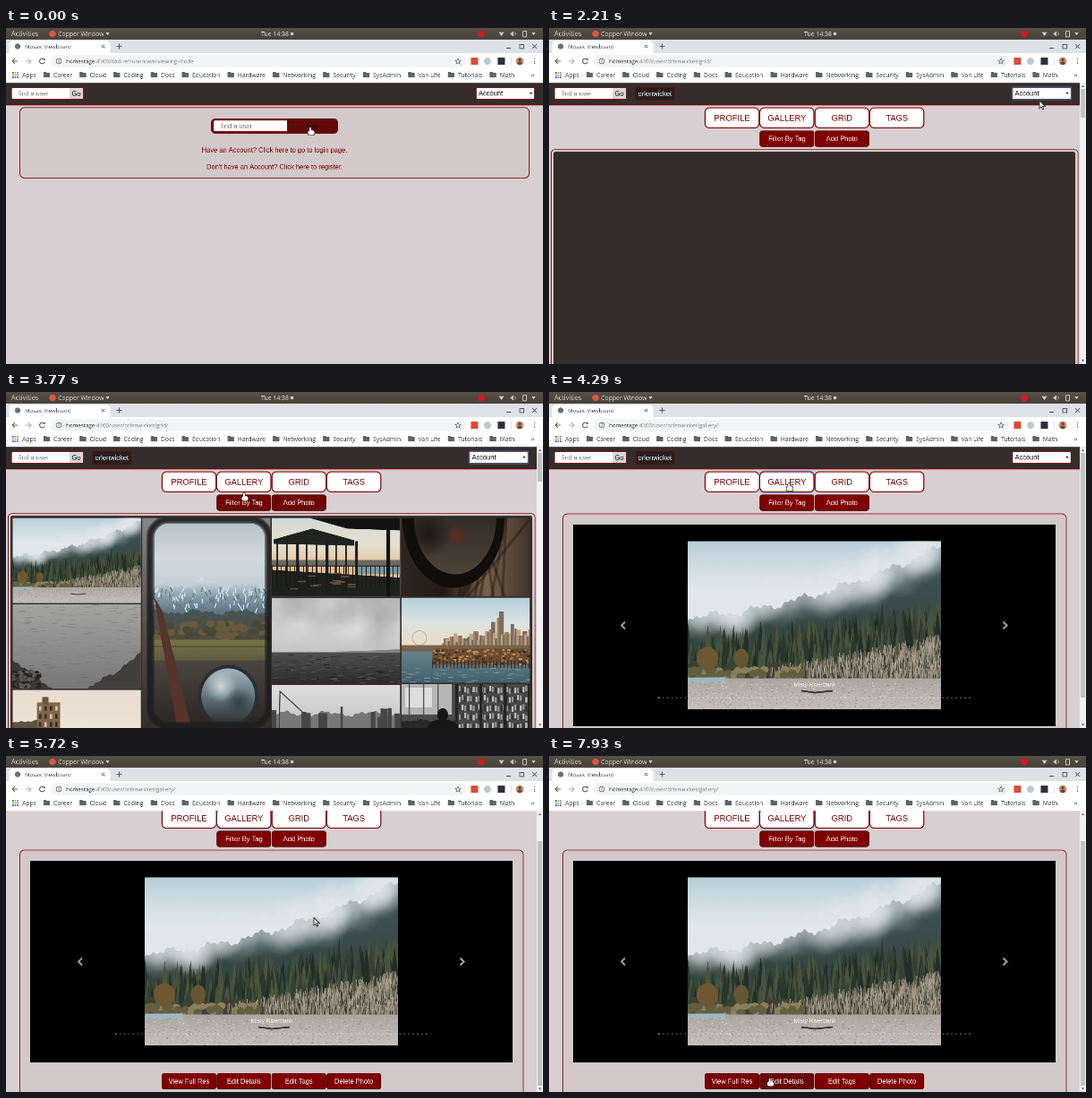
An HTML page with a canvas that plays this animation: 600 by 375 pixels, repeating every 8000 ms.

```html
<!DOCTYPE html>
<html lang="en">
<head>
<meta charset="utf-8">
<title>Photo site walkthrough</title>
<style>
html, body { margin: 0; width: 100%; height: 100%; overflow: hidden; background: #d7cfd1; }
canvas { display: block; width: 600px; height: 375px; }
</style>
</head>
<body>
<canvas id="stage" width="1280" height="800"></canvas>
<script>
const ctx = document.getElementById('stage').getContext('2d');
ctx.scale(1280 / 600, 800 / 375);
const LOOP = 8000, STEP = 130;
const GRID_AT = 1950, PHOTOS_AT = 2470, GALLERY_AT = 4160, SCROLL_AT = 5330;
const TOP = 61.2;
const UI = '"Open Sans", "Noto Sans", sans-serif';
const WEB = '"Liberation Sans", Arial, sans-serif';
const RED = '#7d0000', DARK = '#342d2c', PAGE = '#d7cfd1', PANEL = 'rgba(185,160,165,.14)';
const USER = 'orlenwicket', HOST = 'homestage';

// ---------- helpers ----------
function rect(x, y, w, h, c) {
  ctx.fillStyle = c;
  ctx.fillRect(x, y, w, h);
}
function paint(fill, stroke, lw) {
  if (fill) { ctx.fillStyle = fill; ctx.fill(); }
  if (stroke) { ctx.strokeStyle = stroke; ctx.lineWidth = lw; ctx.stroke(); }
}
function box(x, y, w, h, r, fill, stroke, lw = 1) {
  ctx.beginPath();
  ctx.roundRect(x, y, w, h, r);
  paint(fill, stroke, lw);
}
function oval(x, y, rx, ry, fill, stroke, lw = 1) {
  ctx.beginPath();
  ctx.ellipse(x, y, rx, ry, 0, 0, 7);
  paint(fill, stroke, lw);
}
function trace(pts) {
  ctx.beginPath();
  for (let i = 0; i < pts.length; i += 2) ctx.lineTo(pts[i], pts[i + 1]);
}
function poly(c, ...pts) {
  trace(pts);
  paint(c);
}
function line(c, lw, ...pts) {
  trace(pts);
  paint(null, c, lw);
}
function triangle(x, y, r, c) {
  poly(c, x - r, y - r * 0.7, x + r, y - r * 0.7, x, y + r * 0.7);
}
function chevron(x, y, r, c, lw) {
  line(c, lw, x, y - Math.abs(r), x - r, y, x, y + Math.abs(r));
}
function cross(x, y, r, c) {
  line(c, 0.9, x - r, y - r, x + r, y + r);
  line(c, 0.9, x - r, y + r, x + r, y - r);
}
function text(s, x, y, size, c, font = WEB, align = 'left') {
  ctx.font = `${size}px ${font}`;
  ctx.textAlign = align;
  ctx.fillStyle = c;
  ctx.fillText(s, x, y);
  return ctx.measureText(s).width;
}
function fade(y0, y1, ...colors) {
  const g = ctx.createLinearGradient(0, y0, 0, y1);
  colors.forEach((c, i) => g.addColorStop(i / (colors.length - 1), c));
  return g;
}
function glow(x, y, r, rgb, alpha) {
  const g = ctx.createRadialGradient(x, y, 0, x, y, r);
  g.addColorStop(0, `rgba(${rgb},${alpha})`);
  g.addColorStop(1, `rgba(${rgb},0)`);
  rect(x - r, y - r, r * 2, r * 2, g);
}
function random(seed) {
  return () => (seed = (seed * 16807) % 2147483647) / 2147483647;
}
function rough(x, s) {
  return Math.sin(x * 0.13 + s) + 0.6 * Math.sin(x * 0.31 + 2 * s) + 0.4 * Math.sin(x * 0.83 + 3 * s);
}
// Fills everything below the outline y = f(x)
function land(c, w, h, f) {
  ctx.beginPath();
  ctx.moveTo(0, h);
  for (let x = 0; x <= w; x++) ctx.lineTo(x, f(x));
  ctx.lineTo(w, h);
  paint(c);
}
function repeat(n, seed, each) {
  const rnd = random(seed);
  for (let i = 0; i < n; i++) each(rnd, i);
}
function photo(x, y, w, h, draw, unit = 1) {
  ctx.save();
  ctx.beginPath();
  ctx.rect(x, y, w, h);
  ctx.clip();
  ctx.translate(x, y);
  ctx.scale(unit, unit);
  draw(w / unit, h / unit);
  ctx.restore();
}

// ---------- pointer: time, x, y ----------
const path = [
  [0, 340, 111], [910, 556, 73], [1170, 556, 74], [1560, 552, 128], [2210, 548, 81],
  [2730, 484, 94], [3510, 335, 120], [3770, 266, 113], [4290, 268, 102], [5200, 326, 124],
  [5460, 330, 127], [6300, 391, 361], [6630, 335, 362], [7280, 205, 362], [7930, 246.5, 360]
];
function pointer(t) {
  let i = 0;
  while (i < path.length - 2 && path[i + 1][0] <= t) i++;
  const [t0, x0, y0] = path[i], [t1, x1, y1] = path[i + 1];
  const u = Math.max(0, Math.min(1, (t - t0) / (t1 - t0))), e = u * u * (3 - 2 * u);
  return [x0 + (x1 - x0) * e, y0 + (y1 - y0) * e];
}
function scrollAt(t) {
  return 31 * Math.max(0, Math.min(1, (t - SCROLL_AT + STEP) / (2 * STEP)));
}
function over(b, t) {
  const [x, y] = pointer(t), py = y + scrollAt(t);
  return x >= b.x && x <= b.x + b.w && py >= b.y - 2 && py <= b.y + b.h + 1;
}
// Share of the last moments spent over a button, for its colour change
function heat(b, t) {
  let n = 0;
  for (let k = 0; k < 4; k++) n += over(b, t - k * 90);
  return n / 4;
}
function arrow(x, y) {
  trace([x, y, x, y + 8.6, x + 2, y + 7, x + 3.4, y + 9.8, x + 4.7, y + 9.1, x + 3.5, y + 6.4, x + 6.2, y + 6.2]);
  ctx.closePath();
  paint('#f2f2f2', '#2a2a2a', 0.9);
}
function hand(x, y) {
  for (const [fill, grow] of [['#222', 0.6], ['#fff', 0]]) {
    box(x - 0.9 - grow, y - grow, 1.8 + 2 * grow, 6 + 2 * grow, 1, fill);
    box(x - 2.5 - grow, y + 3.4 - grow, 7 + 2 * grow, 5 + 2 * grow, 2, fill);
  }
}

// ---------- photographs ----------
function forest(w, h) {
  const edge = x => 84 - 78 * (x / w) ** 1.7 + 3 * rough(x, 1);
  const trees = x => 88 - 40 * (x / w) ** 2;
  rect(0, 0, w, h, fade(0, 110, '#b9cfda', '#e3e9ec', '#dbe0e2'));
  land(fade(5, 110, '#43565f', '#33453f'), w, h, edge);
  repeat(60, 41, rnd => {
    const x = rnd() * w;
    glow(x, edge(x) - 14 + rnd() * 24, 26, '226,232,235', 0.36);
  });
  const greens = ['#29362b', '#354231', '#465140', '#222e28', '#4c5439'];
  repeat(260, 9, (rnd, i) => {
    const x = rnd() * w, y = trees(x) + i / 7 + rnd() * 14, r = 3 + rnd() * 4;
    poly(greens[i % 5], x, y, x + r, y + 44, x - r, y + 44);
  });
  land('#3d4131', w, h, x => 138 + 3 * rough(x, 4));
  repeat(700, 5, (rnd, i) => {
    const x = w * (0.3 + 0.7 * Math.sqrt(rnd())), top = 146 - 54 * (x / w - 0.3);
    const y = top + rnd() * (154 - top), lean = rnd() * 4 - 2;
    line(['#9b8f7f', '#b0a594', '#7d7264'][i % 3], 0.9, x, y + 5, x + lean, y - 5);
  });
  repeat(60, 12, (rnd, i) => oval(rnd() * w * 0.45, 143 + rnd() * 8, 5, 4, i % 3 ? '#625f41' : '#8a805b'));
  oval(22, 131, 12, 13, '#6f5731');
  oval(60, 131, 8, 11, '#665633');
  rect(0, 153, w, 35, fade(153, h, '#aca6a0', '#c4bfbb'));
  rect(0, 152, 42, 6, '#9fb7c2');
  repeat(600, 3, (rnd, i) => rect(rnd() * w, 156 + rnd() * 32, 1.3, 0.8, i % 2 ? '#d8d4d0' : '#918b87'));
  line('#40362f', 1.8, 127, 167, 142, 169, 162, 167);
}
function lake(w, h) {
  rect(0, 0, w, h, fade(0, h, '#a5a5a4', '#8d8d8d', '#777'));
  repeat(200, 8, rnd => rect(rnd() * w, rnd() * h, 7, 0.4, 'rgba(60,60,60,.25)'));
  land('#3a3938', w, h, x => 62 + x * 0.72 + 2 * rough(x, 2));
  land('#403f3e', w, h, x => 55 + (w - x) * 0.68 + 2 * rough(x, 5));
  repeat(70, 6, (rnd, i) => oval(rnd() * 30, 74 + rnd() * 20, 2.5, 1.5, i % 2 ? '#5b5957' : '#252423'));
}
function house(w, h) {
  rect(0, 0, w, h, fade(0, h, '#e9dcd0', '#f0e6d8'));
  land('#5c5342', 28, h, x => 35 + rough(x, 1));
  rect(27, 14, 26, h, '#80664c');
  rect(33, 8, 7, 8, '#6a523d');
  repeat(12, 1, (rnd, i) => rect(29.5 + (i % 4) * 6, 18 + (i >> 2) * 9, 2.5, 5, i % 3 ? '#352c25' : '#dccbb5'));
}
function carMirror(w, h) {
  rect(0, 0, w, h, fade(0, h, '#85878a', '#56524d', '#332e2b'));
  ctx.save();
  ctx.beginPath();
  ctx.roundRect(9, 2, w - 11, h - 5, 20);
  ctx.clip();
  rect(0, 0, w, 110, fade(0, 90, '#b3c0c6', '#d3dadd', '#bccad2'));
  land(fade(68, 112, '#d6dfe5', '#8298a6', '#51666f'), w, 118, x => 80 + 4 * rough(x, 2) - 7 * Math.sin(x / 45));
  repeat(130, 17, (rnd, i) => {
    const x = rnd() * w, y = 77 + rnd() * 24;
    line(i % 2 ? '#dce4e8' : '#617886', 1.2, x, y, x + 3 - rnd() * 6, y + 5);
  });
  land(fade(100, 138, '#46555b', '#514e3a'), w, 140, x => 105 + 2 * rough(x, 3));
  repeat(70, 4, (rnd, i) => oval(rnd() * w, 118 + rnd() * 18, 5, 4, i % 2 ? '#474936' : '#6a5a3c'));
  rect(0, 136, w, 24, fade(136, 160, '#77734a', '#5c5b3d'));
  rect(0, 143, w, 1, '#4c4634');
  rect(0, 159, w, h, fade(159, h, '#4b4640', '#2a2522'));
  poly('#56332b', 13, 88, 23, 105, 55, h, 39, h);
  oval(96, 199, 34, 35, '#292f33');
  oval(96, 199, 30, 31, fade(168, 230, '#a5b4bd', '#64757e', '#2d2d2c'));
  glow(88, 188, 18, '226,234,238', 0.8);
  glow(108, 205, 16, '35,48,55', 0.7);
  ctx.restore();
  for (const lw of [9, 6, 4]) box(9, 2, w - 11, h - 5, 20, null, 'rgba(30,30,30,.55)', lw);
}
function pavilion(w, h) {
  rect(0, 0, w, h, fade(0, 58, '#d3d9d8', '#e6e0d2', '#e3bd8d'));
  poly('#12120f', 42, 0, w, 0, w, 14, 84, 12);
  poly('#20231f', 2, 24, 45, 12, 92, 25, 92, 31, 2, 29);
  rect(0, 47, w, 6, '#6c6a60');
  rect(95, 53, w, 10, '#7e989e');
  land('#1f211d', w, h, x => 58 + x * 0.06);
  for (let x = 5; x < 95; x += 11) rect(x, 26, x % 3 ? 1.6 : 3.2, 50, '#1b1d1a');
  for (let x = 0; x < w; x += 5) rect(x, 53, 0.7, 24, '#171915');
  rect(0, 53, w, 1.2, '#171915');
  repeat(14, 7, rnd => rect(20 + rnd() * 70, 60 + rnd() * 20, 9, 1.5, '#665039'));
  rect(128, 8, 4, 80, '#121310');
}
function sea(w, h) {
  rect(0, 0, w, 61, fade(0, 61, '#b5b5b5', '#d6d6d6', '#c4c4c4'));
  repeat(24, 23, (rnd, i) => glow(rnd() * w, rnd() * 45, 22, i % 2 ? '145,145,145' : '232,232,232', 0.25));
  land('#828282', w, 61, x => 60 - 3 * (x / w) ** 3);
  rect(0, 61, w, h, fade(61, h, '#4e4e4e', '#2c2c2c'));
  repeat(150, 14, (rnd, i) => rect(rnd() * w, 63 + rnd() * 32, 6, 0.5, i % 2 ? '#5d5d5d' : '#232323'));
}
function shore(w, h) {
  rect(0, 0, w, h, fade(0, h, '#dedede', '#c3c3c3'));
  land('#777', w, h, x => 32 + 2 * rough(x, 3));
  line('#3c3c3c', 1.2, 8, h, 9, 7, 34, 30);
  repeat(13, 18, rnd => {
    const x = rnd() * w, top = 23 + rnd() * 14;
    rect(x, top, 2 + rnd() * 5, h - top, '#464646');
  });
}
function darkMirror(w, h) {
  const g = ctx.createLinearGradient(0, 0, w, 0);
  ['#30251f', '#241b16', '#76614b', '#40342a'].forEach((c, i) => g.addColorStop(i / 3, c));
  rect(0, 0, w, h, g);
  repeat(12, 6, rnd => line('rgba(25,18,14,.4)', 3, 85 + rnd() * 60, 0, 60 + rnd() * 70, h));
  oval(58, 0, 57, 78, '#100d0b');
  oval(60, 0, 46, 63, fade(0, 63, '#342c26', '#4e4338'));
  glow(30, 18, 26, '20,16,13', 0.8);
  glow(62, 20, 12, '110,40,30', 0.7);
}
function skyline(w, h) {
  rect(0, 0, w, 60, fade(0, 55, '#b3d0da', '#dbe4e2', '#ecdcc2'));
  repeat(46, 73, (rnd, i) => {
    const x = 45 + i * 2.2, high = 7 + rnd() * 11 + 27 * rnd() * Math.exp(-(((x - 113) / 24) ** 2));
    rect(x, 58 - high, 2 + rnd() * 4, high, ['#9d8268', '#806b5b', '#c4a27c', '#716b63'][i % 4]);
  });
  oval(20, 45, 8, 8, null, '#b5aba0', 0.8);
  rect(0, 53, w, 8, '#77634b');
  rect(0, 60, w, h, fade(60, h, '#688389', '#42606a'));
  land('#694c33', w, 75, x => x < 35 ? 75 : 57);
  repeat(120, 8, (rnd, i) => rect(35 + rnd() * 108, 57 + rnd() * 17, 3, 2, ['#a66f3b', '#392f27', '#c39258'][i % 3]));
  for (let x = 34; x < w; x += 4) rect(x, 70, 1.3, 9, '#342d28');
  repeat(80, 2, rnd => rect(rnd() * w, 78 + rnd() * 17, 6, 0.5, '#83989b'));
}
function shop(w, h) {
  rect(0, 0, w, h, '#484848');
  rect(0, 0, 57, 34, '#b5b5b5');
  rect(4, 4, 30, 22, '#dedede');
  for (let x = 8; x < 57; x += 16) rect(x, 0, 1.5, 34, '#555');
  repeat(130, 52, (rnd, i) => {
    const x = 64 + (i % 26) * 3.1, row = Math.floor(i / 26) * 10;
    rect(x, row + 2 + rnd() * 3, 2.2, 6, ['#939393', '#333', '#bdbdbd'][i % 3]);
  });
  for (let x = 60; x < w; x += 27) rect(x, 0, 3.5, h, '#252525');
  land('#292929', 62, h, x => 41 + rough(x, 2));
  oval(46, 34, 6, 7, '#161616');
  oval(46, 50, 17, 11, '#161616');
}

// ---------- browser ----------
const folders = ['Career', 'Cloud', 'Coding', 'Docs', 'Education', 'Hardware', 'Networking',
  'Security', 'SysAdmin', 'Van Life', 'Tutorials', 'Math'];
function systemBar() {
  rect(0, 0, 600, 13, fade(0, 13, '#575148', '#454039'));
  text('Activities', 6, 9, 7.4, '#dfdbd4', UI);
  oval(52, 6.5, 3.7, 3.7, '#d95445');
  text('Copper Window', 58, 9, 6.9, '#dfdbd4', UI);
  triangle(113.5, 6.5, 2.2, '#d2cec8');
  text('Tue 14:38', 285, 9, 6.9, '#e9e5df', UI);
  oval(319.5, 6.5, 1.8, 1.8, '#d2cec8');
  oval(531, 6.5, 4, 4, '#cf1a22');
  triangle(553.5, 6.8, 3.2, '#cbc7c0');
  poly('#cbc7c0', 563, 6.5, 567, 3.5, 567, 9.5);
  line('#cbc7c0', 0.7, 568.4, 4.5, 569.3, 6.5, 568.4, 8.5);
  box(577.5, 3.5, 4, 6.5, 1, null, '#cbc7c0', 0.9);
  triangle(589.5, 6.5, 2.2, '#cbc7c0');
}
function tabStrip() {
  rect(0, 13, 600, 15, '#dee1e6');
  box(3.5, 14.3, 113, 16, 4, '#fff');
  oval(13, 20.5, 3.2, 3.2, '#6c7075');
  text('Mosaic Viewboard', 21, 22.9, 6.1, '#45484b', UI);
  cross(108.5, 20.5, 1.8, '#606468');
  rect(123.5, 20, 6, 1, '#55595d');
  rect(126, 17.5, 1, 6, '#55595d');
  rect(559, 22, 5, 1, '#4d5053');
  box(574, 18.5, 4.5, 4.5, 0, null, '#4d5053', 0.9);
  cross(590.5, 20.5, 2.3, '#4d5053');
}
function toolbar(tail) {
  rect(0, 28, 600, TOP - 28, '#fff');
  for (const [x, d, c] of [[10, 1, '#505458'], [25, -1, '#a8abae']]) {
    rect(x - 3, 36.5, 6, 1, c);
    chevron(x, 37, 3 * d, c, 1);
  }
  ctx.beginPath();
  ctx.arc(40.5, 37, 2.9, 0.4, 5.5);
  paint(null, '#505458', 1);
  triangle(42.8, 35.5, 1.5, '#505458');
  box(50, 30.3, 464, 13.4, 6.7, '#f1f3f4');
  oval(59, 37, 3, 3, null, '#63676b', 0.8);
  rect(58.6, 36.4, 0.9, 2.2, '#63676b');
  rect(58.6, 35, 0.9, 0.9, '#63676b');
  const w = text(HOST, 67, 39.3, 6.2, '#292c2f', UI);
  text(':4100/' + tail, 67 + w, 39.3, 6.2, '#7c8084', UI);
  const star = [];
  for (let i = 0; i <= 10; i++) {
    const a = i * Math.PI / 5, r = i % 2 ? 1.5 : 3.4;
    star.push(505 + Math.sin(a) * r, 37.2 - Math.cos(a) * r);
  }
  line('#64686c', 0.7, ...star);
  rect(519.5, 33, 8, 8, '#db4b35');
  oval(538, 37, 4, 4, '#b8cbd4');
  rect(549.5, 33, 8, 8, '#2b3041');
  rect(564, 32, 0.7, 10, '#ddd');
  oval(574, 37, 4.5, 4.5, '#c99270');
  oval(574, 35.6, 1.6, 1.6, '#684537');
  oval(574, 39.3, 2.6, 1.7, '#684537');
  for (let i = -1; i < 2; i++) oval(590.5, 37 + i * 2.5, 0.7, 0.7, '#56595d');
}
function bookmarks() {
  for (let i = 0; i < 9; i++) {
    rect(7 + (i % 3) * 2.6, 49 + Math.floor(i / 3) * 2.6, 1.7, 1.7, `hsl(${i * 40}, 45%, 50%)`);
  }
  text('Apps', 18, 54.8, 6.8, '#3d4043', UI);
  let x = 53;
  for (const name of folders) {
    box(x - 11.3, 49.2, 3.6, 3, 0.6, '#5f6368');
    box(x - 11.3, 50, 7.4, 5.2, 0.6, '#5f6368');
    x += text(name, x, 54.8, 6.8, '#3d4043', UI) + 19.4;
  }
  text('»', 586.5, 55, 8, '#4d5053', UI);
}

// ---------- pages ----------
const button = (label, i, y, h = 17.5) => ({ label, x: 174.3 + i * 61.4, y, w: 60.3, h });
const tabs = ['PROFILE', 'GALLERY', 'GRID', 'TAGS'].map((s, i) => button(s, i, 89, 22.5));
const tools = ['Filter By Tag', 'Add Photo'].map((s, i) => button(s, i + 1, 114.8));
const edits = ['View Full Res', 'Edit Details', 'Edit Tags', 'Delete Photo'].map((s, i) => button(s, i, 385.2));
const bigGo = { x: 314, y: 101, w: 57, h: 17 };

function shade(h) {
  return `rgb(${128 - 32 * h}, ${10 * h}, ${9 * h})`;
}
function drawButton(b, t) {
  box(b.x, b.y, b.w, b.h, 2.5, shade(heat(b, t)), '#470d0b', 0.7);
  text(b.label, b.x + b.w / 2, b.y + 11.4, 7.5, '#fff', WEB, 'center');
}
function header(selectX, user, focus) {
  rect(0, 61, 600, 25, DARK);
  rect(0, 85.4, 600, 1, RED);
  box(6.2, 66.7, 80.3, 12.6, 1.5, '#fff', '#8d1717', 0.7);
  rect(71, 67.2, 15, 11.6, '#d9d6d7');
  text('find a user', 14, 75.6, 7.2, '#757575');
  text('Go', 73.5, 75.8, 7.5, '#171717');
  if (user) {
    box(97, 66.3, 43, 14.2, 1.5, '#241e1e', RED, 0.8);
    text(USER, 99.5, 76, 7.5, '#fff');
  }
  if (focus) box(selectX - 0.6, 66, 66.2, 13.9, 1.5, null, 'rgba(110,140,200,.75)', 1);
  box(selectX, 66.7, 65, 12.6, 1, '#fff', focus ? '#4c4a68' : '#8d1717', 0.7);
  text('Account', selectX + 2.5, 75.7, 7.5, '#111');
  triangle(selectX + 61, 73, 1.7, '#222');
}
function welcome(t) {
  header(525.5, false, t >= 1040);
  box(15.5, 88.8, 569, 78.5, 5, PANEL, RED, 0.8);
  box(229, 101, 142, 17, 5, '#740000');
  box(bigGo.x, bigGo.y, bigGo.w, bigGo.h, [0, 5, 5, 0], shade(heat(bigGo, t)));
  box(232, 103.3, 82, 12, [2, 0, 0, 2], '#fff');
  text('find a user', 240, 111.9, 7.5, '#777');
  text('Go', 342, 112, 7.5, '#210907', WEB, 'center');
  text('Have an Account? Click here to go to login page.', 300, 138.7, 7.5, RED, WEB, 'center');
  text("Don't have an Account? Click here to register.", 300, 157.5, 7.5, RED, WEB, 'center');
}
function userTop(t, inGallery) {
  header(518, true, !inGallery);
  for (const b of tabs) {
    if (inGallery && b === tabs[1]) box(b.x - 0.8, b.y - 0.8, b.w + 1.6, b.h + 1.6, 6, null, '#83afe8', 1.5);
    box(b.x, b.y, b.w, b.h, 5, '#fff', RED, 1.1);
    text(b.label, b.x + b.w / 2, 103.7, 9.375, RED, WEB, 'center');
  }
  tools.forEach(b => drawButton(b, t));
}
// Four columns; each lists its photographs with their heights
const columns = [
  [[forest, 95], [lake, 94], [house, 50]],
  [[carMirror, 235]],
  [[pavilion, 88], [sea, 95.5], [shore, 50]],
  [[darkMirror, 87.5], [skyline, 95], [shop, 50]]
];
function grid(t) {
  userTop(t, false);
  box(2.5, 135.7, 588.5, 260, 4, null, RED, 0.8);
  box(5, 138.3, 583, 250, 2, DARK);
  if (t < PHOTOS_AT) return;
  columns.forEach((list, i) => {
    let y = 140.5;
    for (const [draw, h] of list) {
      photo(7.5 + i * 144.8, y, 143.3, h, draw, draw === forest ? 0.506 : 1);
      y += h + 1.5;
    }
  });
}
function gallery(t) {
  userTop(t, true);
  box(15.5, 136, 562.5, 285, 5, PANEL, RED, 0.8);
  rect(27, 148, 539, 225, '#000');
  photo(155, 166.5, 283, 187.5, forest);
  chevron(85, 260.5, 4, '#a0a0a0', 2);
  chevron(507.5, 260.5, -4, '#a0a0a0', 2);
  text('Misty Riverbank', 297, 328.5, 6.6, 'rgba(255,255,255,.88)', WEB, 'center');
  for (let i = 0; i < 71; i++) rect(122 + i * 4.96, 340.6, 1.5, 1, i ? 'rgba(255,255,255,.5)' : '#fff');
  edits.forEach(b => drawButton(b, t));
}
function scrollbar(y, h) {
  rect(593, TOP, 7, 375 - TOP, '#f1f1f1');
  rect(594, y, 5, h, '#c1c1c1');
  triangle(596.5, 65, -1.6, '#666');
  triangle(596.5, 371.5, 1.6, '#666');
}

function draw(t) {
  const page = t < GRID_AT ? 0 : t < GALLERY_AT ? 1 : 2;
  const scroll = scrollAt(t);
  rect(0, 0, 600, 375, PAGE);
  ctx.save();
  ctx.translate(0, -scroll);
  [welcome, grid, gallery][page](t);
  ctx.restore();
  if (page === 1) scrollbar(68, 32);
  if (page === 2) scrollbar(68 + scroll * 0.87, 273);
  systemBar();
  tabStrip();
  toolbar(['bad-ref/unknown-viewing-mode', `user/${USER}/grid/`, `user/${USER}/gallery/`][page]);
  bookmarks();

  const links = [[bigGo], [...tabs, ...tools], [...tabs, ...tools, ...edits]][page];
  const [x, y] = pointer(t);
  (links.some(b => over(b, t)) ? hand : arrow)(x, y);
}

let shown = -1;
const begin = performance.now();
function tick() {
  const t = (performance.now() - begin) % LOOP;
  const now = Math.floor(t / STEP) * STEP;
  if (now !== shown) draw(shown = now);
  requestAnimationFrame(tick);
}
tick();
</script>
</body>
</html>
```
